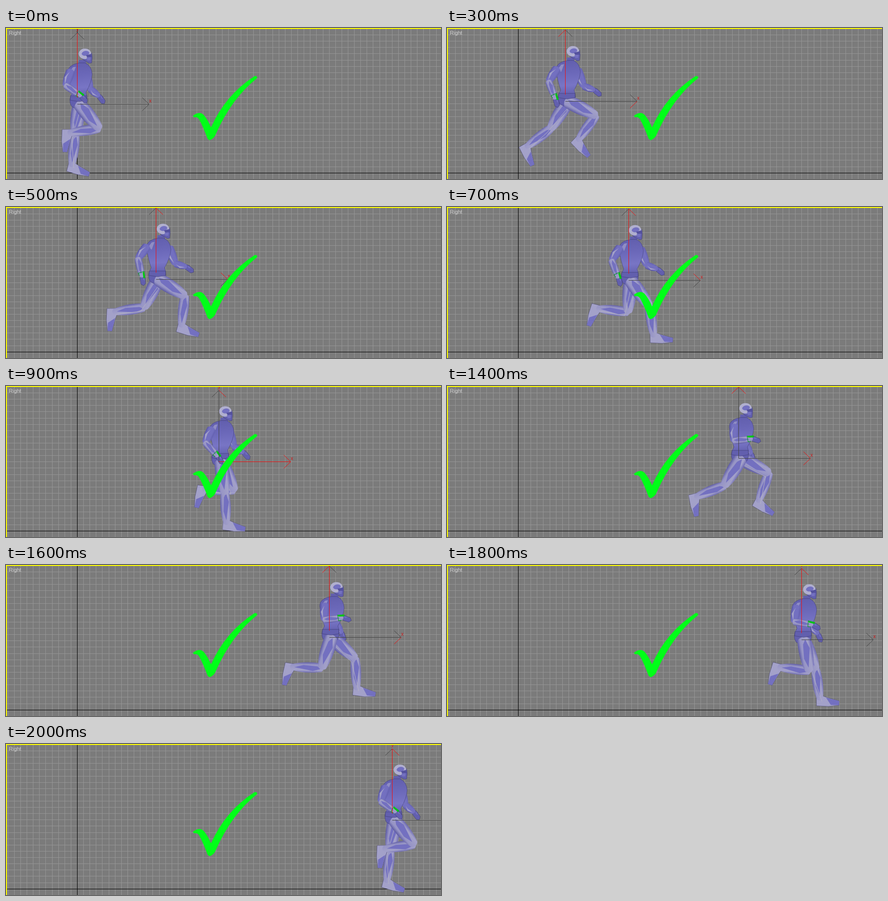
An HTML page with a canvas for the animation above (2100 ms loop, 906 px wide and 316 px high).

```html
<!DOCTYPE html>
<html lang="en">
<head>
<meta charset="utf-8">
<title>Run cycle viewport</title>
<style>
html, body { margin: 0; width: 906px; height: 316px; overflow: hidden; background: #7b7b7b; }
canvas { display: block; }
</style>
</head>
<body>
<canvas id="view" width="906" height="316"></canvas>
<script>
const ctx = document.getElementById('view').getContext('2d');
const STEP = 100, STEPS = 21, CYCLE = 20;
const ORIGIN_X = 148.5, FLOOR = 303.5, CELL = 13.116, AXIS = 149.5, STRIDE = 32.8;
const BLUE = '#7370c0', DEEP = '#54519e', LIGHT = '#a3a1c9', EDGE = 'rgba(45,43,85,.55)', SHADE = '#625fae';

// Swings are in degrees and peak at the given step of the run cycle.
const wave = (step, peak) => Math.cos((step - peak) / CYCLE * 2 * Math.PI);

// Moves from a point; 0 degrees hangs down, positive swings forward.
function reach([x, y], deg, len) {
  const a = deg * Math.PI / 180;
  return [x + len * Math.sin(a), y + len * Math.cos(a)];
}

function shape(fill, stroke, ...pts) {
  ctx.beginPath();
  for (let i = 0; i < pts.length; i += 2) ctx.lineTo(pts[i], pts[i + 1]);
  ctx.closePath();
  ctx.fillStyle = fill;
  ctx.fill();
  if (!stroke) return;
  ctx.strokeStyle = stroke;
  ctx.lineWidth = .8;
  ctx.stroke();
}

function line(color, ...pts) {
  ctx.beginPath();
  for (let i = 0; i < pts.length; i += 2) ctx.lineTo(pts[i], pts[i + 1]);
  ctx.strokeStyle = color;
  ctx.lineWidth = 1;
  ctx.stroke();
}

// Runs paint in a frame whose x axis points from a to b.
function along(a, b, paint) {
  const dx = b[0] - a[0], dy = b[1] - a[1];
  ctx.save();
  ctx.translate(a[0], a[1]);
  ctx.rotate(Math.atan2(dy, dx));
  paint(Math.hypot(dx, dy));
  ctx.restore();
}

function limb(a, b, w0, mid, w1, pale) {
  along(a, b, len => {
    const h0 = w0 / 2, h1 = w1 / 2, m = mid / 2;
    ctx.beginPath();
    ctx.moveTo(0, -h0);
    ctx.bezierCurveTo(len * .3, -m, len * .65, -m, len, -h1);
    ctx.quadraticCurveTo(len + h1, 0, len, h1);
    ctx.bezierCurveTo(len * .65, m, len * .3, m, 0, h0);
    ctx.quadraticCurveTo(-h0 * .9, 0, 0, -h0);
    const g = ctx.createLinearGradient(0, -m, 0, m);
    g.addColorStop(0, SHADE);
    g.addColorStop(.25, pale ? LIGHT : BLUE);
    g.addColorStop(.75, pale ? '#9694c5' : BLUE);
    g.addColorStop(1, DEEP);
    ctx.fillStyle = g;
    ctx.fill();
    ctx.save();
    ctx.clip();
    if (pale) shape(BLUE, null, 0, -m * .2, len * .3, -m * .6, len * .9, 0, len * .6, m * .4, len * .15, m * .2);
    else shape(LIGHT, null, 2, m * .1, len * .4, m * .35, len * .95, m * .2, len * .5, m * .75);
    ctx.restore();
  });
}

function foot(ankle, toe) {
  along(ankle, toe, len => {
    shape(LIGHT, EDGE, -9, -7, 3, -8, 13, -6, len, -3, len + 1, 6, len * .5, 12, -5, 15);
    shape(BLUE, null, 12, -5, len, -3, len + 1, 6, len * .6, 8);
  });
}

function leg(step, far) {
  const thigh = 16 + 48 * wave(step, 3.4);
  const shin = -44 + 53 * wave(step, 7.5);
  const hip = [4, 0];
  const knee = reach(hip, thigh, 66);
  const ankle = reach(knee, shin, 64);
  foot(ankle, reach(ankle, shin + 72, 40));
  limb(knee, ankle, 17, 24, 12, true);
  limb(hip, knee, 27, 31, 17, true);
  if (far) line('#b5b4c2', 6, 12, knee[0] - 7, knee[1] + 8, ankle[0] + 4, ankle[1] + 5);
}

function hand(wrist, tip) {
  along(wrist, tip, len => {
    shape(SHADE, EDGE, -4, -4, 4, -6, len, -5, len + 4, 0, len, 5, 3, 5);
    shape(BLUE, null, 1, -4, len * .7, -4, len * .4, -1);
  });
}

function arm(shoulder, upper, fore, upperLen, foreLen, near) {
  const elbow = reach(shoulder, upper, upperLen);
  const wrist = reach(elbow, fore, foreLen);
  hand(wrist, reach(wrist, fore * .75, 16));
  limb(shoulder, elbow, 18, 20, 13, false);
  limb(elbow, wrist, 14, 16, 10, near);
  if (near) along(elbow, wrist, len => {
    shape('#00c416', null, len - 9, -7, len + 5, -6, len + 5, -2, len - 7, -3);
    line('#009a12', len - 9, -7, len - 8, 6, len - 2, 5);
  });
}

function torso() {
  const g = ctx.createLinearGradient(0, -85, 6, -12);
  g.addColorStop(0, SHADE);
  g.addColorStop(.35, '#6b68b9');
  g.addColorStop(.7, '#7875c5');
  g.addColorStop(1, SHADE);
  shape(SHADE, null, 3, -92, 3, -82, 20, -80, 17, -92);
  ctx.beginPath();
  ctx.moveTo(4, -86);
  ctx.quadraticCurveTo(-20, -82, -20, -66);
  ctx.quadraticCurveTo(-16, -40, -10, -24);
  ctx.quadraticCurveTo(-20, -8, -12, 5);
  ctx.quadraticCurveTo(6, 18, 18, 4);
  ctx.quadraticCurveTo(23, -10, 18, -24);
  ctx.quadraticCurveTo(30, -46, 31, -62);
  ctx.quadraticCurveTo(30, -80, 16, -86);
  ctx.closePath();
  ctx.fillStyle = g;
  ctx.fill();
  ctx.strokeStyle = EDGE;
  ctx.lineWidth = .8;
  ctx.stroke();
  shape('#8f8dc4', null, -17, -66, -9, -77, -3, -78, -9, -62);
}

function pelvis() {
  shape(SHADE, EDGE, -14, -17, 20, -17, 20, -8, 4, -5, -15, -8);
}

function head() {
  const oval = (color, x, y, rx, ry, tilt) => {
    ctx.beginPath();
    ctx.ellipse(x, y, rx, ry, tilt, 0, 2 * Math.PI);
    ctx.fillStyle = color;
    ctx.fill();
  };
  shape(SHADE, EDGE, -11, 2, 13, -6, 14, 4, 13, 15, 8, 16, -4, 9);
  oval('#b0afcf', -1, -4, 13, 11, 0);
  oval(BLUE, 0, -5, 8, 5, -.2);
  shape(DEEP, null, 1, -1, 13, -4, 14, 3, 4, 4);
  shape(BLUE, null, 2, 4, 11, 3, 10, 10, 4, 10);
}

function runner(step) {
  const swing = wave(step, 5);
  arm([17 + 10 * swing, -66], 16 + 5 * swing, 50 + 24 * swing, 36, 23, false);
  leg(step + CYCLE / 2, true);
  torso();
  ctx.save();
  ctx.translate(15.5 + 1.5 * wave(step, 0), -101);
  head();
  ctx.restore();
  leg(step, false);
  pelvis();
  arm([-14 - 5 * swing, -69], -19 - 17 * swing, 56 - 43 * swing, 32, 38, true);
}

// The lit parts of the tripod flip as it moves.
function tripod(x, y, step) {
  const top = y - AXIS, end = x + AXIS;
  const tone = lit => lit ? '#f01010' : '#454545';
  const late = step > 8 && step < 15, mid = step > 4 && step < 15;
  const turn = step % 12 > 1 && step % 12 < 5;
  line(tone(!late), x, top, x, late ? y : y - 14);
  line(tone(turn), x, top, x - 14.5, top + 14);
  line(tone(mid || step > 17), x, top, x + 14.5, top + 14);
  line(tone(late && !turn), x, y, end, y);
  line(tone(mid), end, y, end - 14.5, y - 14);
  line(tone(turn || late), end, y, end - 14.5, y + 14);
  ctx.fillStyle = '#d01818';
  ctx.font = '10px "Liberation Sans", Arial, sans-serif';
  ctx.fillText('x', end, y - 4);
  ctx.fillText('y', x - 2, top - 4);
}

function grid() {
  ctx.fillStyle = '#7b7b7b';
  ctx.fillRect(0, 0, 906, 316);
  const snap = v => Math.floor(v) + .5;
  for (let k = -11; k < 59; k++) {
    const x = snap(ORIGIN_X + k * CELL);
    line('#959595', x, 0, x, 316);
  }
  for (let k = 1; k < 24; k++) {
    const y = snap(FLOOR - .35 - k * CELL);
    line('#959595', 0, y, 906, y);
  }
  line('#000', ORIGIN_X, 0, ORIGIN_X, 316);
  line('#000', 0, FLOOR, 906, FLOOR);
}

function tick() {
  ctx.beginPath();
  ctx.moveTo(389, 184);
  ctx.quadraticCurveTo(402, 173, 411, 181);
  ctx.quadraticCurveTo(420, 191, 427, 208);
  ctx.quadraticCurveTo(457, 140, 518, 100.5);
  ctx.quadraticCurveTo(524, 100, 523, 105);
  ctx.quadraticCurveTo(470, 147, 437, 222);
  ctx.quadraticCurveTo(434, 231, 424, 235);
  ctx.lineTo(420, 232);
  ctx.quadraticCurveTo(410, 205, 402, 191);
  ctx.quadraticCurveTo(398, 185, 392, 187);
  ctx.closePath();
  ctx.fillStyle = '#00ff18';
  ctx.fill();
}

function frame() {
  ctx.fillStyle = '#ffff00';
  ctx.fillRect(0, 0, 906, 2);
  ctx.fillRect(0, 0, 2, 316);
  ctx.fillStyle = '#d2d2d2';
  ctx.font = '11px "Liberation Sans", Arial, sans-serif';
  ctx.fillText('Right', 6, 14);
}

function draw(step) {
  const x = ORIGIN_X + step * STRIDE;
  const y = 155 + 4 * wave(2 * step, 0);
  grid();
  ctx.save();
  ctx.translate(x, y);
  runner(step);
  ctx.restore();
  tripod(Math.floor(x) + .5, Math.floor(y) + .5, step);
  tick();
  frame();
}

let start = null;
function loop(now) {
  if (start === null) start = now;
  draw(Math.floor((now - start) / STEP) % STEPS);
  requestAnimationFrame(loop);
}
draw(0);
requestAnimationFrame(loop);
</script>
</body>
</html>
```
